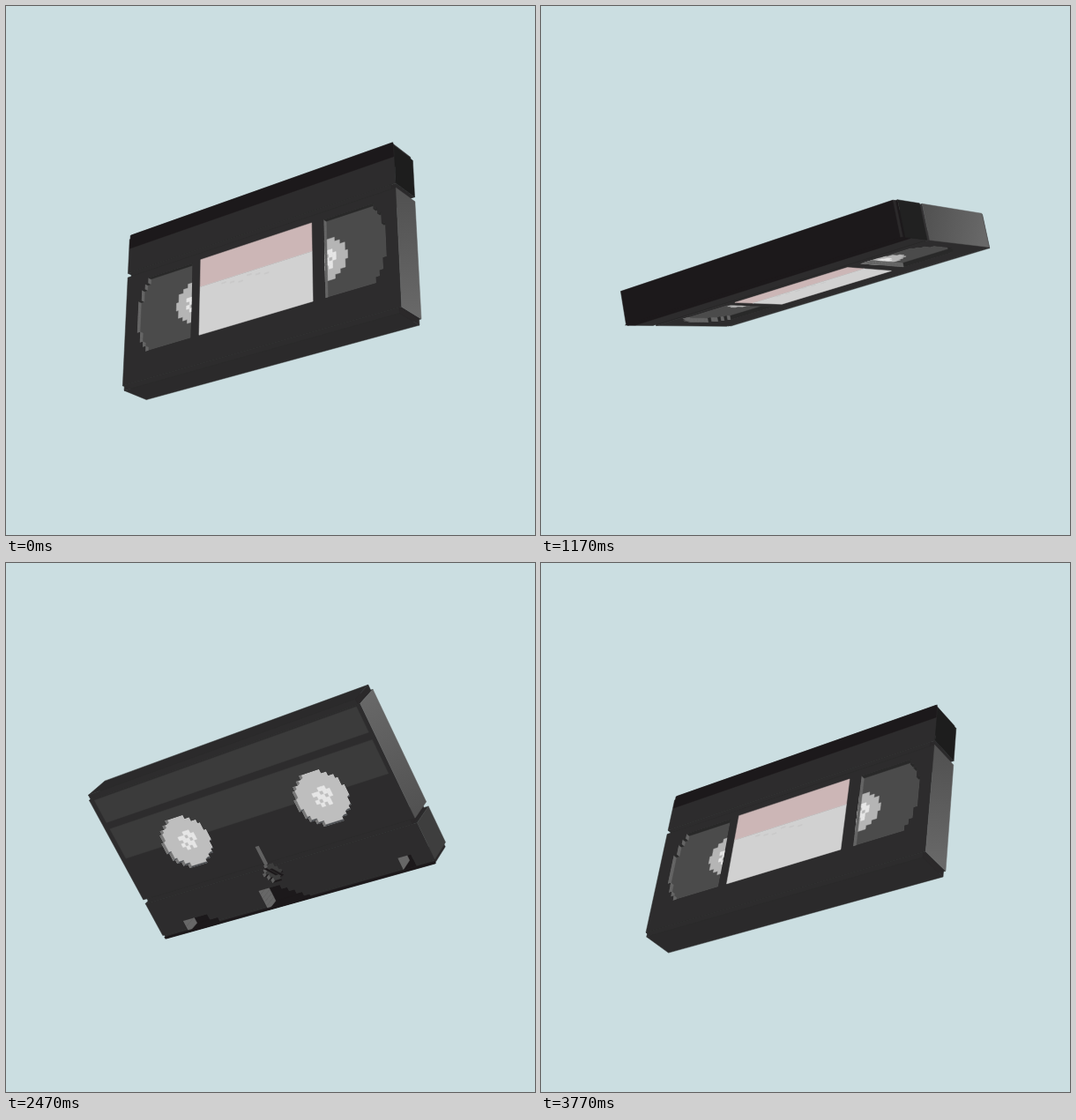
These frames come from a looping animation (600x600 px, 3.9 s). An HTML page with a canvas:

```html
<!DOCTYPE html>
<html lang="en">
<head>
<meta charset="utf-8">
<title>Rotating cassette</title>
<style>
html, body { margin: 0; width: 100%; height: 100%; overflow: hidden; background: #cbdee1; }
canvas { display: block; width: 600px; height: 600px; }
</style>
</head>
<body>
<canvas id="stage" width="600" height="600"></canvas>
<script>
const ctx = document.getElementById('stage').getContext('2d');
const STEP = 130, STEPS = 30;
const W = 373, H = 203, T = 20;      // width, height, half thickness
const LIFT = -8.8;                   // centre of the tape below the axis
const DIST = 1600;
const RIGHT = [0.812, 0, -0.583], UP = [0.258, 0.897, 0.333], NEAR = [0.523, -0.442, 0.728];
const BODY = '#2d2c2d', BLACK = '#1c191b';
let cos = 1, sin = 0;

const gray = v => `rgb(${v | 0},${v | 0},${v | 0})`;
const dot = (p, q) => p[0] * q[0] + p[1] * q[1] + p[2] * q[2];

// Turn about the long axis, then view from the lower right.
function project([x, y, z]) {
  const p = [x, y * cos - z * sin, y * sin + z * cos];
  const k = DIST / (DIST - dot(p, NEAR));
  return [292.6 + dot(p, RIGHT) * k, 299 - dot(p, UP) * k];
}

// a and b run from 0 to 1 across and down a face.
const at = (a, b, z) => [(a - 0.5) * W, LIFT + (0.5 - b) * H, z];
const front = d => ([a, b]) => at(a, b, T - d);
const back = d => ([a, b]) => at(a, 1 - b, d - T);

function area(p) {
  return p.reduce((sum, [x, y], i) => {
    const [u, v] = p[(i + 1) % p.length];
    return sum + x * v - u * y;
  }, 0);
}

function trace(p) {
  ctx.beginPath();
  p.forEach(([x, y]) => ctx.lineTo(x, y));
  ctx.closePath();
}

function fill(points, color) {
  const p = points.map(project);
  if (area(p) <= 0) return;
  trace(p);
  ctx.fillStyle = ctx.strokeStyle = color;
  ctx.lineWidth = 0.5;
  ctx.fill();
  ctx.stroke();
}

const rect = (a, b, c, d) => [[a, b], [c, b], [c, d], [a, d]];
const paint = (side, shape, color, depth = 0) => fill(shape.map(side(depth)), color);

// Recess with a floor, floor details and the walls that face the viewer.
function hole(side, shape, depth, floor, wall, edge, details) {
  const open = shape.map(side(0)).map(project);
  if (area(open) <= 0) return;
  ctx.save();
  trace(open);
  ctx.clip();
  ctx.fillStyle = floor;
  ctx.fill();
  if (details) details();
  const near = side(0), far = side(depth);
  shape.forEach((p, i) => {
    const q = shape[(i + 1) % shape.length];
    const upright = Math.abs(p[0] - q[0]) < 0.001;
    fill([near(p), near(q), far(q), far(p)], upright ? wall : edge);
  });
  ctx.restore();
}

// Stepped outline from a half width per row; t runs from -1 to 1.
function rows(n, top, bottom, leftAt, rightAt) {
  const left = [], right = [];
  for (let i = 0; i < n; i++) {
    const t = (2 * i + 1) / n - 1;
    const y0 = top + (bottom - top) * i / n, y1 = top + (bottom - top) * (i + 1) / n;
    right.push([rightAt(t), y0], [rightAt(t), y1]);
    left.unshift([leftAt(t), y1], [leftAt(t), y0]);
  }
  return right.concat(left);
}

function disc(a, b, r) {
  const half = t => Math.round(Math.sqrt(1 - t * t) * r / 3.3) * 3.3 / W;
  return rows(Math.round(r / 2.5), b - r / H, b + r / H, t => a - half(t), t => a + half(t));
}

function windowShape(inner, outer) {
  const cut = t => 0.0125 * Math.min(3, Math.floor(4.4 * t * t));
  return outer < inner
    ? rows(14, 0.327, 0.795, t => outer + cut(t), () => inner)
    : rows(14, 0.327, 0.795, () => inner, t => outer - cut(t));
}

// Hole open at the lower edge, its right side going down in stairs.
const stairs = (n, a, b, c, d) => rows(n, b, 1, () => a, t => c + (d - c) * (t + 1) / 2);

function hub(side, a, b, depth) {
  for (let i = -2; i <= 2; i++) {
    for (let j = -2; j <= 2; j++) {
      if (i * i + j * j > 6 || (i - j + 6) % 3 === 1) continue;
      const x = a + i * 4.6 / W, y = b + j * 4.6 / H;
      paint(side, rect(x - 2.3 / W, y - 2.3 / H, x + 2.3 / W, y + 2.3 / H), '#e6e6e6', depth);
    }
  }
}

function slab(b0, b1, inset, end, top) {
  const a0 = inset, a1 = 1 - inset;
  const quad = (color, ...p) => fill(p.map(q => at(...q)), color);
  quad(BODY, [a0, b0, T], [a1, b0, T], [a1, b1, T], [a0, b1, T]);
  quad(BODY, [a0, b1, -T], [a1, b1, -T], [a1, b0, -T], [a0, b0, -T]);
  quad(top, [a0, b0, -T], [a1, b0, -T], [a1, b0, T], [a0, b0, T]);
  quad('#2b2a2b', [a0, b1, T], [a1, b1, T], [a1, b1, -T], [a0, b1, -T]);
  quad(end, [a1, b0, T], [a1, b0, -T], [a1, b1, -T], [a1, b1, T]);
}

// Flap edge, flap, neck, main part and spine, farthest first.
function drawBody(turn) {
  const cuts = [0, 0.025, 0.252, 0.28, 0.968, 1];
  const flap = gray(29 + 42 * Math.max(0, Math.cos(turn - 3.35)));
  const main = ctx.createLinearGradient(...project(at(1, 0.28, 0)), ...project(at(1, 0.97, 0)));
  main.addColorStop(0, gray(82));
  main.addColorStop(1, gray(104));
  const order = [0, 1, 2, 3, 4];
  if (dot([0, cos, sin], NEAR) > 0) order.reverse();
  for (const i of order) {
    const wide = i % 2;
    const end = !wide ? '#2b292a' : i === 1 ? flap : main;
    slab(cuts[i], cuts[i + 1], wide ? -0.003 : i === 2 ? 0.012 : 0.004, end, i < 3 ? BLACK : '#343334');
  }
}

function drawFront() {
  paint(front, rect(0, 0, 1, 0.088), BLACK);
  paint(front, rect(0.296, 0.322, 0.712, 0.495), '#ccb6b6');
  paint(front, rect(0.296, 0.495, 0.712, 0.792), '#d1d1d1');
  for (let i = 0; i < 6; i++) {
    const a = 0.38 + i * 0.032, b = 0.512 + (i % 3) * 0.012;
    paint(front, rect(a, b, a + 0.016, b + 0.007), '#c9c8c8');
  }
  for (const [inner, outer] of [[0.264, 0.047], [0.755, 0.963]]) {
    hole(front, windowShape(inner, outer), 5, '#4b4b4b', '#656565', '#292929', () => {
      paint(front, disc(inner, 0.562, 25), '#b5b5b5', 5);
      hub(front, inner, 0.562, 5);
    });
  }
}

function drawBack() {
  paint(back, rect(0.015, 0.042, 0.988, 0.193), '#3b3b3b');
  paint(back, rect(0.015, 0.237, 0.988, 0.44), '#3b3b3b');
  for (const a of [0.255, 0.757]) {
    hole(back, disc(a, 0.457, 32.5), 5, '#bebebe', '#777', '#4a4d50', () => hub(back, a, 0.457, 5));
  }

  // Slot with a ribbed catch below it.
  hole(back, rect(0.473, 0.61, 0.487, 0.74), 8, '#232223', '#616161', BLACK);
  hole(back, disc(0.487, 0.79, 12), 6, '#3c3c3c', '#5e5e5e', BLACK);
  for (let i = 0; i < 2; i++) {
    const x = 0.466 + i * 0.018, y = 0.752 + i * 0.012;
    paint(back, [[x, y], [x + 0.008, y], [x + 0.035, y + 0.055], [x + 0.027, y + 0.055]], BLACK);
  }

  const notches = [stairs(2, 0.098, 0.92, 0.18, 0.24), stairs(5, 0.41, 0.87, 0.48, 0.58),
                   rect(0.896, 0.911, 0.94, 0.985)];
  notches.forEach(shape => hole(back, shape, 22, BLACK, '#676767', BLACK));
  paint(back, rect(0, 0.987, 1, 1), BLACK);
}

function draw(now) {
  const turn = Math.floor(now / STEP) % STEPS / STEPS * Math.PI * 2;
  cos = Math.cos(turn);
  sin = Math.sin(turn);
  ctx.fillStyle = '#cbdee1';
  ctx.fillRect(0, 0, 600, 600);
  drawBody(turn);
  drawFront();
  drawBack();
}

const start = performance.now();
function tick() {
  draw(performance.now() - start);
  requestAnimationFrame(tick);
}
tick();
</script>
</body>
</html>
```
